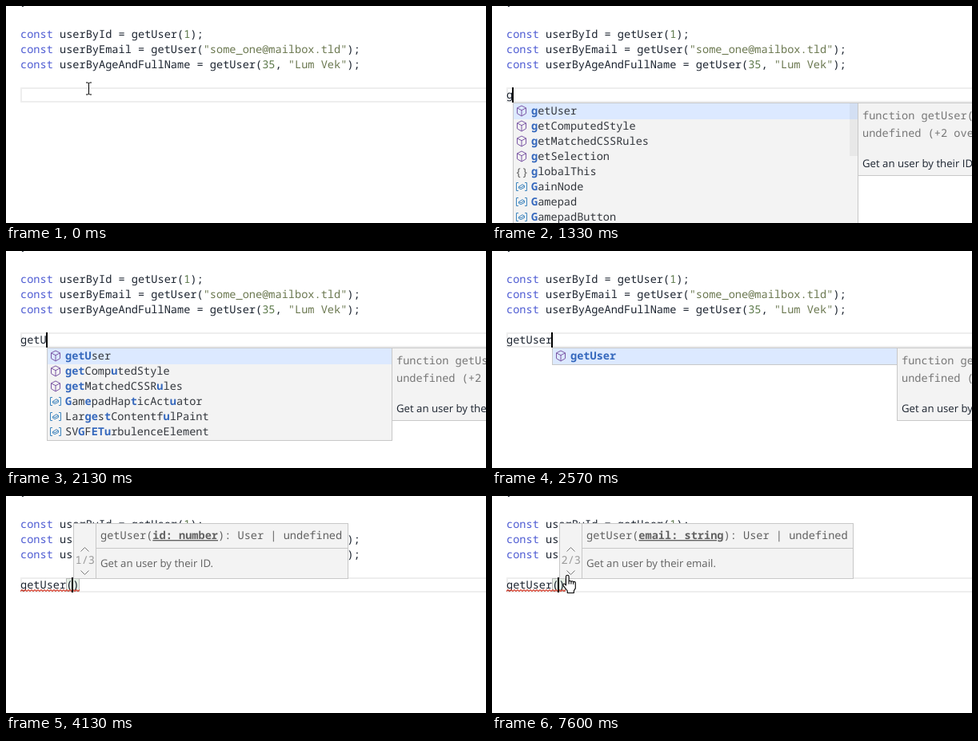
Animation of 600 by 272 pixels, one loop 8 s. Source, as an HTML page:

```html
<!DOCTYPE html>
<html lang="en">
<head>
<meta charset="utf-8">
<title>Overload hints</title>
<style>
  html, body { margin: 0; width: 100%; height: 100%; overflow: hidden; background: #fff; }
  svg { display: block; }
  text { font: 13.62px "Noto Sans Mono", monospace; white-space: pre; fill: #1c2430; text-rendering: geometricPrecision; }
  .sans { font: 13.2px "Open Sans", sans-serif; }
  .key { fill: #4d5bd3; }
  .str { fill: #6b7850; }
  .num { fill: #5d7a4c; }
  .soft { fill: #616161; }
  .faint { fill: #9a9a9a; }
  .detail { fill: #777; }
  .entry { fill: #33373d; }
  .match { fill: #3568bd; font-weight: 600; }
  .param { font-weight: 700; text-decoration: underline; }
  .panel { fill: #f3f3f3; stroke: #c8c8c8; }
  .rule { fill: none; stroke: #c8c8c8; }
  .icon { fill: none; stroke-linejoin: round; }
  .method { stroke: #7a55a4; }
  .type { stroke: #3f86bf; }
  .pair { fill: #006400; fill-opacity: .1; stroke: #b9b9b9; }
</style>
</head>
<body>
<svg width="600" height="272" viewBox="0 0 600 272">
  <rect x="19" y="103" width="600" height="17" fill="none" stroke="#eee" stroke-width="2"/>
  <text x="18" y="-1">}</text>
  <text x="18" y="40"><tspan class="key">const</tspan> userById = getUser(<tspan class="num">1</tspan>);</text>
  <text x="18" y="59"><tspan class="key">const</tspan> userByEmail = getUser(<tspan class="str">"some_one@mailbox.tld"</tspan>);</text>
  <text x="18" y="78"><tspan class="key">const</tspan> userByAgeAndFullName = getUser(<tspan class="num">35</tspan>, <tspan class="str">"Lum Vek"</tspan>);</text>
  <g id="scene"></g>
  <g id="pointer"></g>
</svg>
<script>
const LOOP = 8000, LEFT = 18, CHAR = 8.172, ROW = 19, LIST_WIDTH = 431;
const scene = document.getElementById('scene');
const pointer = document.getElementById('pointer');

const typing = [
  [0, ''], [1300, 'g'], [1470, 'ge'], [1630, 'get'], [2130, 'getU'],
  [2270, 'getUs'], [2370, 'getUse'], [2570, 'getUser'], [3130, 'getUser()']
];
const caretResets = [430, ...typing.slice(1).map(([time]) => time), 6600];

const getters = ['getUser', 'getComputedStyle', 'getMatchedCSSRules', 'getSelection'];
const geoTypes = ['Geolocation', 'GeolocationCoordinates', 'GeolocationPosition', 'GeolocationPositionError'];
const suggestions = {
  g: [...getters, 'globalThis', 'GainNode', 'Gamepad', 'GamepadButton'],
  ge: [...getters, ...geoTypes],
  get: [...getters, ...geoTypes],
  getU: [...getters.slice(0, 3), 'GamepadHapticActuator', 'LargestContentfulPaint', 'SVGFETurbulenceElement'],
  getUs: getters.slice(0, 3),
  getUse: getters.slice(0, 2),
  getUser: getters.slice(0, 1)
};

const column = n => LEFT + n * CHAR;
const between = (t, from, to) => t >= from && t < to;
const text = (x, y, content, cls = '') => `<text x="${x}" y="${y}" class="${cls}">${content}</text>`;
const rect = (x, y, w, h, attrs) => `<rect x="${x}" y="${y}" width="${w}" height="${h}" ${attrs}/>`;
const path = (d, attrs) => `<path d="${d}" ${attrs}/>`;

// Marks the letters of word that match the typed letters in order.
function highlight(word, typed) {
  let next = 0;
  return [...word].map(letter => {
    if (next >= typed.length || letter.toLowerCase() !== typed[next].toLowerCase()) return letter;
    next++;
    return `<tspan class="match">${letter}</tspan>`;
  }).join('');
}

function icon(word, x, y) {
  if (word === 'globalThis') return text(x - 8, y + 5, '{}', 'soft');
  const shape = word.startsWith('get')
    ? path('M0-6.5L5.5-3.7V3.2L0 6.5-5.5 3.2V-3.7ZM-5.5-3.7L0-.8 5.5-3.7M0-.8V6.5', 'class="icon method"')
    : path('M-4-5h-2.5V5H-4M4-5h2.5V5H4M-3.5 0L1-2.8 3.5-1.2V1L-1 3.2-3.5 1.8ZM-3.5 0L-1 1.2 3.5-1.2', 'class="icon type"');
  return `<g transform="translate(${x} ${y})">${shape}</g>`;
}

function suggestBox(typed, t) {
  const words = suggestions[typed];
  const x = Math.round(column(typed.length));
  const right = x + LIST_WIDTH;
  let out = rect(right + .5, 121.5, 300, 91, 'class="panel"')
    + text(right + 6, 142, 'function getUser(id: number): User |', 'detail')
    + text(right + 6, 164, 'undefined (+2 overloads)', 'detail')
    + text(right + 6, 202, 'Get an user by their ID.', 'sans')
    + rect(x + .5, 121.5, LIST_WIDTH, words.length * ROW + 2, 'class="panel"')
    + rect(x + 1, 122, LIST_WIDTH - 1, ROW + 1, 'fill="#dce9ff"');
  words.forEach((word, i) => {
    out += icon(word, x + 11, 131.5 + i * ROW) + text(x + 23, 136 + i * ROW, highlight(word, typed), 'entry');
  });
  if (words.length === 8) {
    const opacity = .4 * Math.min(1, .2 + Math.max(0, t - 1340) / 100);
    out += rect(right - 10, 122, 10, typed === 'g' ? 66 : 103, `fill="#646464" opacity="${opacity}"`);
  }
  return out;
}

function signatureHint(index, param, description, width) {
  return rect(84.5, 34.5, width, 69, 'class="panel"')
    + path(`M112.5 35V103M113 65.5H${84 + width}`, 'class="rule"')
    + path('M93.5 69.5l5-5 5 5M93.5 93.5l5 5 5-5', 'fill="none" stroke="#777"')
    + text(86.5, 85, `${index}/3`, 'faint')
    + text(118, 54, `getUser(<tspan class="param">${param}</tspan>): User | undefined`, 'soft')
    + text(118, 89, description, 'sans soft');
}

function squiggle(from, to, y) {
  let d = `M${from} ${y}`;
  for (let x = from, up = true; x < to; x += 2, up = !up) d += `l2 ${up ? -2 : 2}`;
  return path(d, 'fill="none" stroke="#d8402f" stroke-width="1.1"');
}

function caretVisible(t) {
  const reset = caretResets.filter(time => time <= t).pop();
  return reset !== undefined && !between(t, 6430, 6600) && (t - reset) % 1000 < 500;
}

function drawScene(t) {
  const typed = typing.filter(([time]) => time <= t).pop()[1];
  const called = typed.endsWith('()');
  let out = '';
  if (called && t >= 3170) {
    for (const n of [7, 8]) out += rect(Math.round(column(n)) + .5, 103.5, 8, 16, 'class="pair"');
  }
  out += text(LEFT, 116, typed, typed === 'get' ? 'key' : '');
  if (t >= 3630) out += squiggle(LEFT, 91, 119.5);
  if (caretVisible(t)) {
    out += rect(Math.round(column(called ? 8 : typed.length)) - (typed ? 1 : 0), 102, 2, 19, 'fill="#000"');
  }
  if (t >= 1330 && suggestions[typed]) out += suggestBox(typed, t);
  if (between(t, 3270, 6430)) out += signatureHint(1, 'id: number', 'Get an user by their ID.', 343);
  if (t >= 6600) out += signatureHint(2, 'email: string', 'Get an user by their email.', 367);
  return out;
}

// Each move: start, end, from x, y, to x, y, easing.
const smooth = p => p * p * (3 - 2 * p);
const moves = [
  [30, 170, 104, 104, 101, 96, smooth],
  [170, 430, 101, 96, 97, 110, smooth],
  [700, 937, 97, 110, 320, 250, p => p ** 1.7],
  [5270, 5830, 120, 246, 97, 108, p => 1 - (1 - p) ** 2],
  [5830, 5970, 97, 108, 95, 100, smooth]
];

function drawPointer(t) {
  if (between(t, 970, 5270)) return '';
  const [start, end, x0, y0, x1, y1, ease] = moves.filter(([time]) => time <= t).pop() || moves[0];
  const p = ease(Math.min(1, Math.max(0, (t - start) / (end - start))));
  const x = x0 + (x1 - x0) * p, y = y0 + (y1 - y0) * p;
  const shape = t > 5830 && y < 104
    ? path('M-2 1.5a1.8 1.8 0 0 1 3.6 0v6a1.6 1.6 0 0 1 2.8.3 1.6 1.6 0 0 1 2.8.6 1.5 1.5 0 0 1 2.6 1.2v6.5l-2 3.4v2.5h-8v-2.5l-5.2-6.6c-1-2 1-3 2.3-1.8l1.1 1.2zM1.6 7.5v3.5M4.4 7.8v3.2M7.2 8.4v2.8',
      'fill="#fff" stroke="#000" stroke-width="1.1" stroke-linejoin="round"')
    : path('M-3.5-7.5h2.5l1 1 1-1h2.5M-3.5 7.5h2.5l1-1 1 1h2.5M0-6.5V6.5', 'fill="none" stroke="#000"');
  return `<g transform="translate(${Math.round(x) - .5} ${Math.round(y) - .5})">${shape}</g>`;
}

const shown = new Map();
function update(node, markup) {
  if (shown.get(node) === markup) return;
  shown.set(node, markup);
  node.innerHTML = markup;
}

const began = performance.now();
function tick() {
  const t = (performance.now() - began) % LOOP;
  update(scene, drawScene(t));
  update(pointer, drawPointer(t));
  requestAnimationFrame(tick);
}
tick();
</script>
</body>
</html>
```
